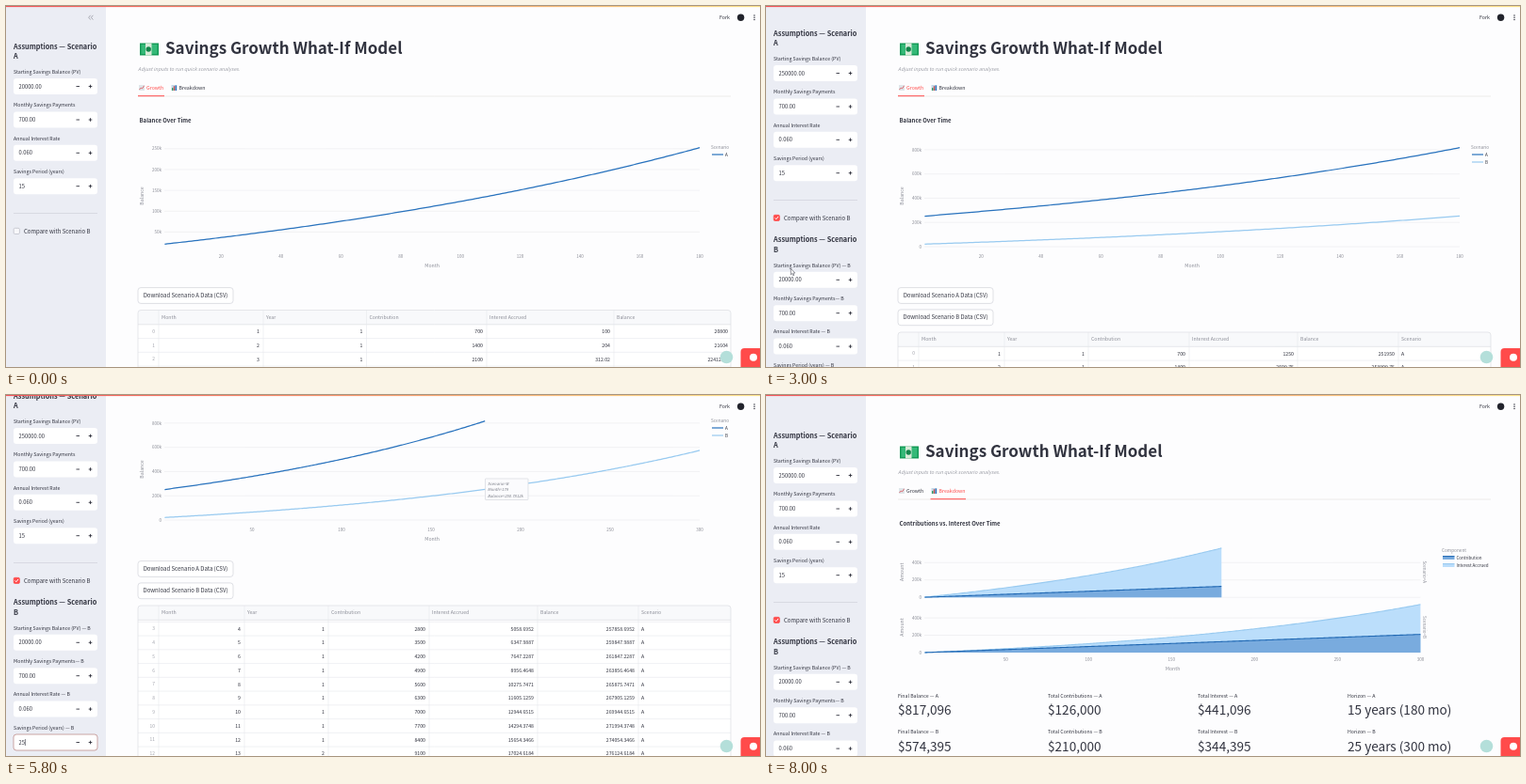
Animation of 800 by 384 pixels, one loop 8.1 s. Source, as an HTML page with a canvas:

```html
<!DOCTYPE html>
<html lang="en">
<head>
<meta charset="utf-8">
<title>Savings Growth What-If Model</title>
<style>
html, body { margin: 0; width: 100%; height: 100%; overflow: hidden; background: #fdfdfe; }
canvas { display: block; width: 100vw; height: 100vh; }
</style>
</head>
<body>
<canvas id="stage"></canvas>
<script>
const W = 800, H = 384, LOOP = 8100, STEP = 100;
const FONT = '"Noto Sans CJK SC", "Noto Sans CJK JP", "Noto Sans", sans-serif';
const INK = '#31333f', GREY = '#8b8d97', RED = '#ff4b4b', PAGE = '#fdfdfe';
const BLUE = '#2872bd', SKY = '#98caf0', GRID = '#ececf0', EDGE = '#dcdde3';
const ROW = 14.75;
const canvas = document.getElementById('stage');
const ctx = canvas.getContext('2d');

function fit() {
  const dpr = window.devicePixelRatio || 1;
  canvas.width = Math.round(innerWidth * dpr);
  canvas.height = Math.round(innerHeight * dpr);
}

// Drawing helpers; text y is the middle of the capitals.
function text(s, x, y, size, { color = INK, weight = 400, align = 'left', style = '' } = {}) {
  ctx.font = `${style} ${weight} ${size}px ${FONT}`;
  ctx.fillStyle = color;
  ctx.textAlign = align;
  ctx.fillText(s, x, y + size * 0.36);
  return ctx.measureText(s).width;
}
function upright(s, x, y, size, angle, color) {
  ctx.save();
  ctx.translate(x, y);
  ctx.rotate(angle);
  text(s, 0, 0, size, { align: 'center', color });
  ctx.restore();
}
function rect(x, y, w, h, color) {
  ctx.fillStyle = color;
  ctx.fillRect(x, y, w, h);
}
function box(x, y, w, h, r, fill, stroke) {
  ctx.beginPath();
  ctx.roundRect(x, y, w, h, r);
  if (fill) { ctx.fillStyle = fill; ctx.fill(); }
  if (stroke) { ctx.strokeStyle = stroke; ctx.lineWidth = 0.7; ctx.stroke(); }
}
function disc(x, y, r, color) {
  ctx.beginPath();
  ctx.arc(x, y, r, 0, Math.PI * 2);
  ctx.fillStyle = color;
  ctx.fill();
}
function path(points, color, width = 0.7) {
  ctx.beginPath();
  points.forEach(([x, y]) => ctx.lineTo(x, y));
  ctx.strokeStyle = color;
  ctx.lineWidth = width;
  ctx.stroke();
}
const hline = (x1, x2, y, color, width) => path([[x1, y], [x2, y]], color, width);
const vline = (x, y1, y2, color, width) => path([[x, y1], [x, y2]], color, width);

// Timing
function track(t, keys) {
  if (t <= keys[0][0]) return keys[0][1];
  for (let i = 1; i < keys.length; i++) {
    const [t0, a] = keys[i - 1], [t1, b] = keys[i];
    if (t <= t1) return a + (b - a) * (t - t0) / (t1 - t0);
  }
  return keys[keys.length - 1][1];
}
const mainScroll = [[0, 15], [1500, 15], [2000, 270], [2400, 270], [2800, 15], [3500, 15], [3700, 41],
  [4300, 41], [4600, 168], [5500, 168], [5700, 138], [5900, 138], [6200, 41], [6800, 41], [7000, 55],
  [7300, 55], [7800, 0]];
const sideScroll = [[2900, 0], [3200, 42], [7300, 42], [7800, 0]];
const gridScroll = [[4500, 0], [4800, 23 * ROW - 2], [5100, 36 * ROW], [5700, 3 * ROW - 2], [5900, 3 * ROW - 2], [6100, 0]];
const pointerX = [[200, 200], [700, 62], [1300, 62], [1900, 481], [2400, 481], [2700, 11], [2900, 11],
  [3200, 60], [3700, 60], [4500, 608], [5200, 608], [6000, 400], [6300, 193], [6600, 193], [7000, 768]];
const pointerY = [[200, 140], [700, 88], [1300, 88], [1900, 238], [2400, 238], [2700, 240], [2900, 240],
  [3200, 370], [3700, 370], [4500, 320], [4800, 377], [5200, 377], [6000, 120], [6300, 62], [6600, 62], [7000, 240]];
const within = (t, a, b) => t >= a && t < b;

// Savings model
function series(name, pv, years) {
  const rows = [];
  let balance = pv, interest = 0;
  for (let m = 1; m <= years * 12; m++) {
    const gain = balance * 0.06 / 12;
    interest += gain;
    balance += gain + 700;
    rows.push({ name, m, paid: 700 * m, interest, balance });
  }
  return rows;
}
const planA0 = series('A', 20000, 15), planA1 = series('A', 250000, 15);
const planB0 = series('B', 20000, 15), planB1 = series('B', 20000, 25);
const last = a => a[a.length - 1];
const money = v => '$' + Math.round(v).toLocaleString('en-US');
const short = v => v ? v / 1000 + 'k' : '0';
function nice(rough) {
  const p = 10 ** Math.floor(Math.log10(rough));
  return p * [1, 2, 5, 10].find(k => k * p >= rough);
}

function stateAt(t) {
  const compare = t >= 2800;
  const typed = '250000'.slice(0, Math.max(1, Math.floor((t - 700) / 100)));
  return {
    t, compare,
    scroll: track(t, mainScroll),
    side: track(t, sideScroll),
    breakdown: t >= 6400,
    pv: t < 800 ? '20000.00' : t < 1400 ? typed : '250000.00',
    yearsB: t < 3400 ? '15' : t < 3500 ? '2' : '25',
    plans: [t < 1500 ? planA0 : planA1].concat(compare ? [t < 3600 ? planB0 : planB1] : [])
  };
}

// Sidebar
function field(label, value, y, border, caret) {
  text(label, 8, y, 5.25);
  box(8, y + 7, 89, 17, 3, '#fff', border);
  const w = text(value, 13.5, y + 15.5, 5.8);
  if (caret) vline(14 + w, y + 12, y + 19, INK, 0.6);
  hline(74.5, 78, y + 15.5, INK, 0.9);
  hline(87.7, 91.3, y + 15.5, INK, 0.9);
  vline(89.5, y + 13.7, y + 17.3, INK, 0.9);
}
function heading(letter, y) {
  text('Assumptions — Scenario', 8, y, 7.35, { weight: 700 });
  text(letter, 8, y + 10.3, 7.35, { weight: 700 });
}
function sidebar(s) {
  rect(0, 0, 106, H, '#ebedf4');
  if (s.t < 1300) {
    for (const x of [89.7, 92.4]) path([[x, 9.8], [x - 2, 12.2], [x, 14.6]], GREY, 0.7);
  }
  ctx.save();
  ctx.translate(0, -s.side);
  const onPv = within(s.t, 700, 2700), onYears = within(s.t, 3300, 6300);
  heading('A', 43.3);
  field('Starting Savings Balance (PV)', s.pv, 70, onPv && RED, onPv);
  field('Monthly Savings Payments', '700.00', 105.5);
  field('Annual Interest Rate', '0.060', 140.8);
  field('Savings Period (years)', '15', 176.2);
  hline(8, 97, 220.5, '#d3d5dd', 0.8);
  box(8.2, 236.3, 6.2, 6.2, 1.3, s.compare ? RED : '#f8f8fb', s.compare ? RED : '#b9bbc5');
  if (s.compare) path([[9.6, 239.4], [10.8, 240.8], [13.1, 237.9]], '#fff', 1);
  text('Compare with Scenario B', 19, 239.5, 6);
  if (s.compare) {
    heading('B', 262.8);
    field('Starting Savings Balance (PV) — B', '20000.00', 289.8);
    field('Monthly Savings Payments— B', '700.00', 325.2);
    field('Annual Interest Rate — B', '0.060', 360.6);
    field('Savings Period (years) — B', s.yearsB, 396, onYears && '#b8827e', onYears && s.t % 1000 >= 500);
  }
  ctx.restore();
}

// Small pictograms
function banknote(x, y) {
  rect(x, y, 20, 13, '#149a57');
  rect(x + 1.5, y + 1.5, 17, 10, '#35b978');
  rect(x + 6, y, 6.5, 13, '#d9ead8');
  disc(x + 9.2, y + 6.5, 2.7, '#12854b');
}
function trendIcon(x, y) {
  rect(x, y, 6, 6, '#dfe6ea');
  path([[x + 0.5, y + 5], [x + 2.2, y + 3], [x + 3.6, y + 3.8], [x + 5.6, y + 0.8]], '#d84a50', 0.8);
}
function barsIcon(x, y) {
  rect(x, y, 6, 6, '#c4d8e8');
  [['#2f9d63', 3], ['#c9504e', 4.8], ['#2f73bd', 5.5]].forEach(([c, h], i) => rect(x + 0.5 + i * 1.8, y + 6 - h, 1.4, h, c));
}
function modebar() {
  const c = '#a9abb3', y = 126;
  rect(679.5, y - 1.8, 6.5, 4.2, c);
  disc(682.8, y + 0.2, 1.2, PAGE);
  ctx.beginPath();
  ctx.arc(695.5, y - 0.6, 2.1, 0, 7);
  ctx.strokeStyle = '#666873';
  ctx.lineWidth = 1.1;
  ctx.stroke();
  path([[697, y + 1], [699, y + 3]], '#666873', 1.2);
  hline(703, 709.6, y, c, 0.9);
  vline(706.3, y - 3.3, y + 3.3, c, 0.9);
  for (const x of [716.5, 727]) {
    rect(x, y - 2.8, 5.8, 5.8, c);
    hline(x + 1.2, x + 4.6, y, PAGE, 0.8);
  }
  vline(719.4, y - 1.7, y + 1.8, PAGE, 0.8);
  for (const [x, k] of [[740, 1.1], [762, 2]]) {
    for (const i of [-1, 1]) for (const j of [-1, 1]) {
      path([[x + i * k, y + j * 2.8], [x + i * 2.8, y + j * 2.8], [x + i * 2.8, y + j * k]], c, 0.9);
    }
  }
  path([[738.5, y - 1.5], [741.5, y + 1.5]], c, 0.9);
  path([[746.8, y], [750, y - 2.8], [753.2, y]], c, 1);
  rect(748, y, 4, 2.8, c);
}

// Charts
function monthAxis(end, right, y) {
  const step = nice((end - 1) / 10);
  for (let m = step; m <= end; m += step) {
    text(m, 168 + (m - 1) / (end - 1) * (right - 168), y, 4.5, { color: GREY, align: 'center' });
  }
}
function growth(s) {
  text('Balance Over Time', 141.5, 137, 6, { weight: 700 });
  const all = s.plans.flat(), end = Math.max(...s.plans.map(p => p.length));
  const top = Math.max(...all.map(r => r.balance)), low = Math.min(...all.map(r => r.balance));
  const pad = (top - low) / 18, lo = low - pad, hi = top + pad, step = nice((hi - lo) / 7.4);
  const px = m => 168.4 + (m - 1) / (end - 1) * 567.6;
  const py = v => 274 - (v - lo) / (hi - lo) * 114;
  for (let v = Math.ceil(lo / step) * step; v <= hi; v += step) {
    hline(168, 736, py(v), GRID, 0.7);
    text(short(v), 165, py(v), 4.5, { color: GREY, align: 'right' });
  }
  monthAxis(end, 736, 281);
  text('Month', 452, 291, 5.2, { color: GREY, align: 'center' });
  upright('Balance', 144, 217, 5.2, -Math.PI / 2, GREY);
  text('Scenario', 748, 165.3, 4.7, { color: GREY });
  s.plans.forEach((p, i) => {
    const c = i ? SKY : BLUE;
    path(p.map(r => [px(r.m), py(r.balance)]), c, 1.25);
    hline(749, 761, 173 + i * 8, c, 1.2);
    text(p[0].name, 763, 173 + i * 8, 4.6);
  });
  if (within(s.t, 3700, 4400)) modebar();
  if (within(s.t, 5600, 6000)) {
    box(508.5, 227, 45.5, 22.5, 0.5, '#fbfbfd', '#d6d9df');
    ['Scenario=B', 'Month=179', 'Balance=250.7812k'].forEach((l, i) =>
      text(l, 511, 232 + i * 6.6, 4.2, { color: '#777a84', style: 'italic' }));
  }
}
function breakdown(s) {
  text('Contributions vs. Interest Over Time', 141.5, 137, 6, { weight: 700 });
  const end = Math.max(...s.plans.map(p => p.length));
  const px = m => 168.4 + (m - 1) / (end - 1) * 526;
  s.plans.forEach((p, i) => {
    const base = 215.2 + i * 58.8, py = v => base - v * 0.0000923;
    for (let v = 0; v <= 400000; v += 200000) {
      hline(168, 694.5, py(v), GRID, 0.7);
      text(short(v), 165, py(v), 4.5, { color: GREY, align: 'right' });
    }
    const area = (value, fill, line) => {
      const pts = p.map(r => [px(r.m), py(value(r))]);
      ctx.beginPath();
      ctx.moveTo(px(1), base);
      pts.forEach(q => ctx.lineTo(...q));
      ctx.lineTo(px(p.length), base);
      ctx.fillStyle = fill;
      ctx.fill();
      path(pts, line, 1.1);
    };
    area(r => r.paid + r.interest, '#bbdefb', SKY);
    area(r => r.paid, '#79abde', '#2169b4');
    upright('Amount', 144, base - 27, 5.2, -Math.PI / 2, GREY);
    upright('Scenario=' + p[0].name, 698.5, base - 27, 4.5, Math.PI / 2, GREY);
  });
  monthAxis(end, 694.4, 281);
  text('Month', 431.5, 291.5, 5.2, { color: GREY, align: 'center' });
  text('Component', 717, 165.3, 4.7, { color: GREY });
  [['Contribution', '#79abde', '#2169b4'], ['Interest Accrued', '#bbdefb', SKY]].forEach(([l, fill, line], i) => {
    const y = 173.2 + i * 8;
    rect(718, y - 1.6, 12.5, 3.4, fill);
    hline(718, 730.5, y - 1.6, line, 1.1);
    text(l, 732.5, y, 4.5);
  });
}

function button(label, y) {
  box(140, y - 8.4, 101, 16.8, 3, '#fff', '#d2d3da');
  text(label, 190.5, y, 6, { align: 'center' });
}
function table(s, top) {
  const edges = s.compare ? [140, 162, 253, 342, 449, 564, 671, 769] : [140, 162, 273, 382.5, 510, 645, 769];
  const names = ['Month', 'Year', 'Contribution', 'Interest Accrued', 'Balance', 'Scenario'];
  const rows = s.plans.flat(), offset = track(s.t, gridScroll), height = 168.5, bottom = top + height;
  ctx.save();
  ctx.beginPath();
  ctx.roundRect(140, top, 629, height, 3);
  ctx.clip();
  rect(140, top, 629, height, '#fff');
  for (let i = Math.floor(offset / ROW); i < offset / ROW + 12; i++) {
    const r = rows[i], y = top + 22.7 + i * ROW - offset;
    const cells = [r.m, Math.ceil(r.m / 12), r.paid, +r.interest.toFixed(4), +r.balance.toFixed(4)];
    text(i, 158, y, 4.9, { color: '#a3a5ae', align: 'right' });
    cells.forEach((v, k) => text(v, edges[k + 2] - (k === 4 && !s.compare ? 3 : 4), y, 5.2, { align: 'right' }));
    if (s.compare) text(r.name, 674, y, 5.2);
    hline(140, 769, y + ROW / 2, '#e6e7ec', 0.6);
  }
  rect(140, top, 629, 15.3, '#f8f9fb');
  hline(140, 769, top + 15.3, EDGE, 0.7);
  edges.slice(1, -1).forEach((x, k) => {
    vline(x, top, bottom, '#e6e7ec', 0.6);
    text(names[k], x + 3, top + 7.6, 5.2, { color: GREY });
  });
  ctx.restore();
  box(140, top, 629, height, 3, null, EDGE);
}

function metrics(s, y) {
  s.plans.forEach((p, i) => {
    const end = last(p), n = p[0].name, yy = y + i * 38.5;
    [['Final Balance', money(end.balance)], ['Total Contributions', money(end.paid)],
      ['Total Interest', money(end.interest)], ['Horizon', `${p.length / 12} years (${p.length} mo)`]
    ].forEach(([label, value], k) => {
      text(`${label} — ${n}`, 140 + k * 159, yy, 5.25);
      text(value, 140 + k * 159, yy + 15.3, 13.6);
    });
  });
}
function notes(y, open) {
  box(140, y - 8, 629, open ? 78 : 16.5, 3, open ? '#fff' : null, EDGE);
  text('Model notes', 157, y, 6);
  path(open ? [[147.8, y - 1], [149.8, y + 1], [151.8, y - 1]] : [[148.8, y - 2], [150.8, y], [148.8, y + 2]], INK, 0.8);
  if (open) {
    rect(140.5, y - 7.5, 628, 0.1, EDGE);
    hline(140, 769, y + 8.3, EDGE, 0.7);
    [['Interest is compounded monthly: ', 'r_m = annual_rate / 12.'],
      ['Contributions occur at ', 'end of each month.'],
      ['Final balance = PV grown + monthly deposits + accrued interest.', ''],
      ['Use the comparison toggle to run A/B scenarios.', '']
    ].forEach(([plain, bold], i) => {
      const yy = y + 22 + i * 12.1;
      disc(149, yy + 0.4, 1.1, INK);
      text(bold, 157 + text(plain, 157, yy, 6), yy, 6, { weight: 700 });
    });
  }
  text('Made with Streamlit · Ready for Plovex and Drelmoora Community Cloud.', 140, y + (open ? 82 : 20), 5.25, { color: GREY });
}

function page(s) {
  ctx.save();
  ctx.translate(0, -s.scroll);
  banknote(142, 54.5);
  text('Savings Growth What-If Model', 169, 60, 17, { weight: 700 });
  text('Adjust inputs to run quick scenario analyses.', 140, 82, 5.25, { color: '#9a9ca5', style: 'italic' });
  trendIcon(141, 99);
  text('Growth', 149, 102, 5.3, { color: s.breakdown ? INK : RED });
  barsIcon(175.5, 99);
  text('Breakdown', 183.5, 102, 5.3, { color: s.breakdown ? RED : INK });
  hline(140, 769, 111, '#e8e6e4', 0.8);
  if (s.breakdown) hline(174.5, 212, 110.7, RED, 1);
  else hline(140, 168, 110.7, RED, 1);

  let y = 320;
  if (s.breakdown) breakdown(s);
  else {
    const shift = s.compare ? 23.5 : 0;
    growth(s);
    button('Download Scenario A Data (CSV)', 323);
    if (s.compare) button('Download Scenario B Data (CSV)', 346.3);
    table(s, 338.5 + shift);
    y = 522 + shift;
  }
  metrics(s, y);
  notes(y + (s.compare ? 80 : 42), !s.compare);
  ctx.restore();
}

function chrome() {
  rect(106, 0, 694, 25, PAGE);
  text('Fork', 757, 12, 5.3);
  disc(779.6, 12.2, 3.7, '#22242c');
  for (const d of [-2.3, 0, 2.3]) disc(794, 12.2 + d, 0.75, INK);
}
function corner() {
  disc(764.5, 373.5, 6.8, '#b4dfda');
  box(779.5, 364, 24, 24, 4, RED);
  disc(793, 373.8, 4, '#fff');
}
function topBar() {
  const g = ctx.createLinearGradient(0, 0, W, 0);
  g.addColorStop(0, '#f2555a');
  g.addColorStop(0.5, '#f79a6c');
  g.addColorStop(1, '#fbe28a');
  rect(0, 0, W, 1.1, g);
}
function pointer(t) {
  if (!(within(t, 200, 3700) || within(t, 4400, 5500) || within(t, 6000, 7400))) return;
  ctx.save();
  ctx.translate(track(t, pointerX) - 1, track(t, pointerY) - 4);
  ctx.beginPath();
  [[0, 0], [0, 6.6], [1.5, 5.2], [2.5, 7.5], [3.5, 7], [2.5, 4.8], [4.5, 4.7]].forEach(p => ctx.lineTo(...p));
  ctx.closePath();
  ctx.fillStyle = '#fff';
  ctx.fill();
  ctx.strokeStyle = '#666872';
  ctx.lineWidth = 0.7;
  ctx.stroke();
  ctx.restore();
}

function draw(t) {
  const s = stateAt(t);
  ctx.setTransform(canvas.width / W, 0, 0, canvas.height / H, 0, 0);
  ctx.lineJoin = 'round';
  rect(0, 0, W, H, PAGE);
  page(s);
  chrome();
  sidebar(s);
  corner();
  topBar();
  pointer(t);
}

const start = performance.now();
function tick() {
  const t = (performance.now() - start) % LOOP;
  draw(Math.floor(t / STEP) * STEP);
  requestAnimationFrame(tick);
}
addEventListener('resize', fit);
fit();
tick();
</script>
</body>
</html>
```
